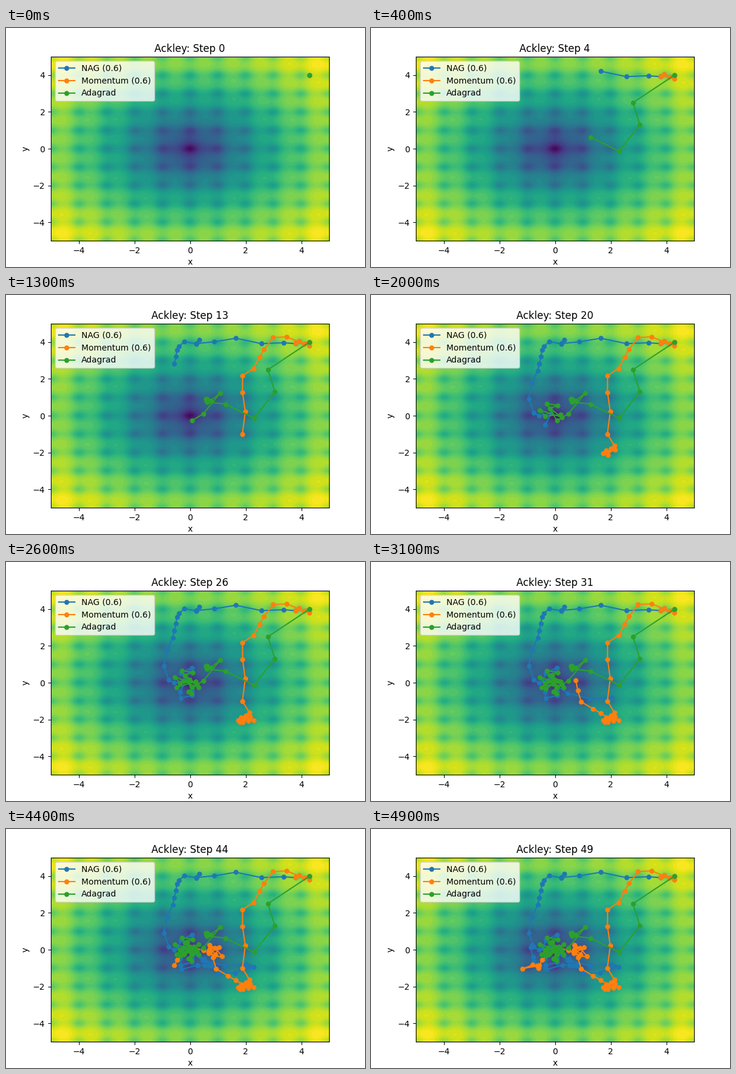
Write a matplotlib script that moves like this. It is 600 px wide and 400 px high and loops after 5 s.

```python
import matplotlib.pyplot as plt
import numpy as np
from matplotlib.animation import FuncAnimation

STEPS = 50
INTERVAL = 100
START = np.array([4.3, 4.0])
MOMENTUM = 0.6


def ackley(x, y):
    bowl = -20 * np.exp(-0.2 * np.sqrt(0.5 * (x**2 + y**2)))
    ripple = -np.exp(0.5 * (np.cos(2 * np.pi * x) + np.cos(2 * np.pi * y)))
    return bowl + ripple + np.e + 20


def gradient(p):
    radius = np.sqrt(0.5 * np.sum(p**2)) + 1e-12
    bowl = 2 * p / radius * np.exp(-0.2 * radius)
    ripple = np.exp(0.5 * np.sum(np.cos(2 * np.pi * p)))
    return bowl + np.pi * np.sin(2 * np.pi * p) * ripple


def momentum_path(lookahead, rate=0.1):
    """Heavy-ball descent; lookahead evaluates the gradient ahead (Nesterov)."""
    p, velocity = START.copy(), np.zeros(2)
    path = [p]
    for _ in range(STEPS - 1):
        probe = p - MOMENTUM * velocity if lookahead else p
        velocity = MOMENTUM * velocity + rate * gradient(probe)
        p = p - velocity
        path.append(p)
    return np.array(path)


def adagrad_path(rate=1.5, eps=1e-8):
    p, total = START.copy(), np.zeros(2)
    path = [p]
    for _ in range(STEPS - 1):
        g = gradient(p)
        total = total + g**2
        p = p - rate * g / (np.sqrt(total) + eps)
        path.append(p)
    return np.array(path)


paths = {
    f"NAG ({MOMENTUM})": momentum_path(lookahead=True),
    f"Momentum ({MOMENTUM})": momentum_path(lookahead=False),
    "Adagrad": adagrad_path(),
}

fig, ax = plt.subplots(figsize=(6, 4), dpi=100)
axis = np.linspace(-5, 5, 200)
X, Y = np.meshgrid(axis, axis)
ax.contourf(X, Y, ackley(X, Y), levels=50, cmap="viridis")
ax.set(xlim=(-5, 5), ylim=(-5, 5), xlabel="x", ylabel="y")
lines = [ax.plot([], [], "o-", markersize=5, label=name)[0] for name in paths]
ax.legend(loc="upper left")
title = ax.set_title("")


def update(step):
    for line, path in zip(lines, paths.values()):
        line.set_data(path[:step + 1, 0], path[:step + 1, 1])
    title.set_text(f"Ackley: Step {step}")
    return [*lines, title]


anim = FuncAnimation(fig, update, frames=STEPS, interval=INTERVAL,
                     repeat=True, repeat_delay=0, blit=False)
plt.show()
```
